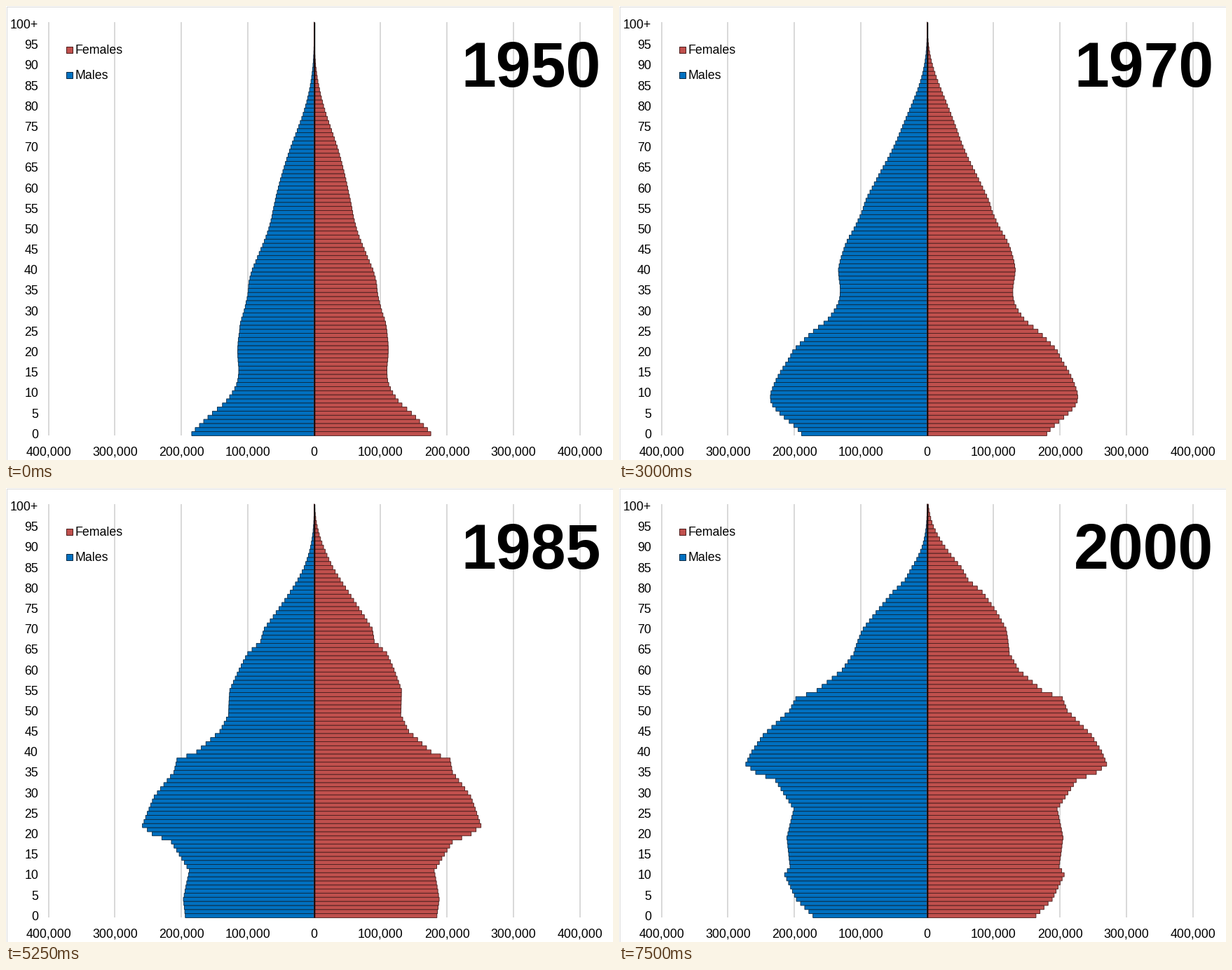
Recreate the animation shown at these times as a matplotlib script. Size 866 by 647 pixels, loop 8 s.

```python
import numpy as np
import matplotlib.pyplot as plt
from matplotlib.animation import FuncAnimation
from matplotlib.patches import Rectangle

W, H, DPI = 866, 647, 64
PT = 72 / DPI                      # points per pixel
X0, STEP = 439.7, 94.75            # centre line, pixels per 100,000 people
TOP, BOTTOM = 23, 612.4
ROW = (BOTTOM - TOP) / 101
AGES = np.arange(101)
BLUE, RED = "#0070C0", "#C0504D"
BLUE_EDGE, RED_EDGE = "#0B2B45", "#4D1F1E"
GRID = "#D9D9D9"

plt.rcParams["font.family"] = "Liberation Sans"

# Birth year and size of the cohort at its peak, as a bar length in pixels.
COHORTS = [(1850, 10), (1870, 31), (1880, 48), (1890, 59), (1900, 67),
           (1910, 90), (1915, 102), (1918, 100), (1921, 116), (1930, 131),
           (1936, 128), (1940, 139), (1945, 171), (1947, 201), (1950, 207),
           (1956, 241), (1963, 266), (1965, 253), (1967, 225), (1974, 203),
           (1981, 220), (1988, 222), (1990, 233), (1996, 220), (2000, 196)]
BIRTHS = np.arange(1840, 2011)
SIZES = np.interp(BIRTHS, *zip(*COHORTS))
SMOOTH = np.convolve(SIZES, np.ones(7) / 7, mode="same")


def pyramid(year):
    """Male and female bar lengths for every age."""
    born = year - AGES
    # counts up to 1970 blur the jumps between cohorts
    size = np.interp(born, BIRTHS, SMOOTH if year <= 1970 else SIZES)
    share = np.interp(born, (1890, 1925), (0.88, 0.98))

    # immigration adds to a cohort until 40, then mortality wears it down
    inflow = np.interp(born, (1925, 1950), (0.0085, 0.0042))
    young = np.maximum(40 - AGES, 0)
    male_risk = 0.95 * np.exp(0.097 * (AGES - 80))
    female_risk = 0.48 * np.exp(0.11 * (AGES - 80) - 0.012 * (year - 1985))

    males = size * (1 - inflow * young) * np.exp(-male_risk)
    females = size * share * (1 - (inflow + 0.0006) * young) * np.exp(-female_risk)
    return males, females


fig = plt.figure(figsize=(W / DPI, H / DPI), dpi=DPI, facecolor="white")
ax = fig.add_axes([0, 0, 1, 1])
ax.axis("off")


def label(x, y, text, ha="left", size=17.8, **kw):
    return ax.text(x, y, text, ha=ha, va="baseline", fontsize=size * PT,
                   color="black", **kw)


def vline(x, color, width, z):
    ax.plot([x, x], [TOP, BOTTOM], color=color, lw=width * PT, zorder=z,
            solid_capstyle="butt")


def make_bars(fill, edge):
    return ax.barh(BOTTOM - (AGES + 0.5) * ROW, np.zeros(101), height=ROW, left=X0,
                   color=fill, edgecolor=edge, linewidth=0.9 * PT, zorder=3,
                   snap=False)


ax.add_patch(Rectangle((0.5, 0.5), W - 1, H - 1, fill=False, ec=GRID, lw=PT))

for k in range(-4, 5):
    x = X0 + k * STEP
    vline(x, GRID, 2, 1)
    label(x, 640.6, f"{abs(k) * 100000:,}", ha="center")
vline(X0, "black", 1.4, 5)

for age in range(0, 101, 5):
    y = BOTTOM - (age + 0.5) * ROW + 6.2
    label(46, y, "100+" if age == 100 else str(age), ha="right")

for y, name, fill, edge in ((57.5, "Females", RED, RED_EDGE),
                            (93.5, "Males", BLUE, BLUE_EDGE)):
    ax.add_patch(Rectangle((85.5, y), 9, 9, fc=fill, ec=edge, lw=PT, zorder=3))
    label(98, y + 10.3, name, zorder=4)

title = label(649.3, 114.8, "1950", size=89.5, weight="bold", zorder=6)
sides = ((make_bars(BLUE, BLUE_EDGE), -1), (make_bars(RED, RED_EDGE), 1))
ax.set_xlim(0, W)
ax.set_ylim(H, 0)


def draw(frame):
    year = 1950 + 5 * min(frame // 3, 10)
    for (bars, sign), lengths in zip(sides, pyramid(year)):
        for bar, length in zip(bars, lengths):
            bar.set_width(sign * length)
    title.set_text(str(year))
    return []


anim = FuncAnimation(fig, draw, frames=32, interval=250, repeat=True,
                     repeat_delay=0, blit=False)
plt.show()
```
